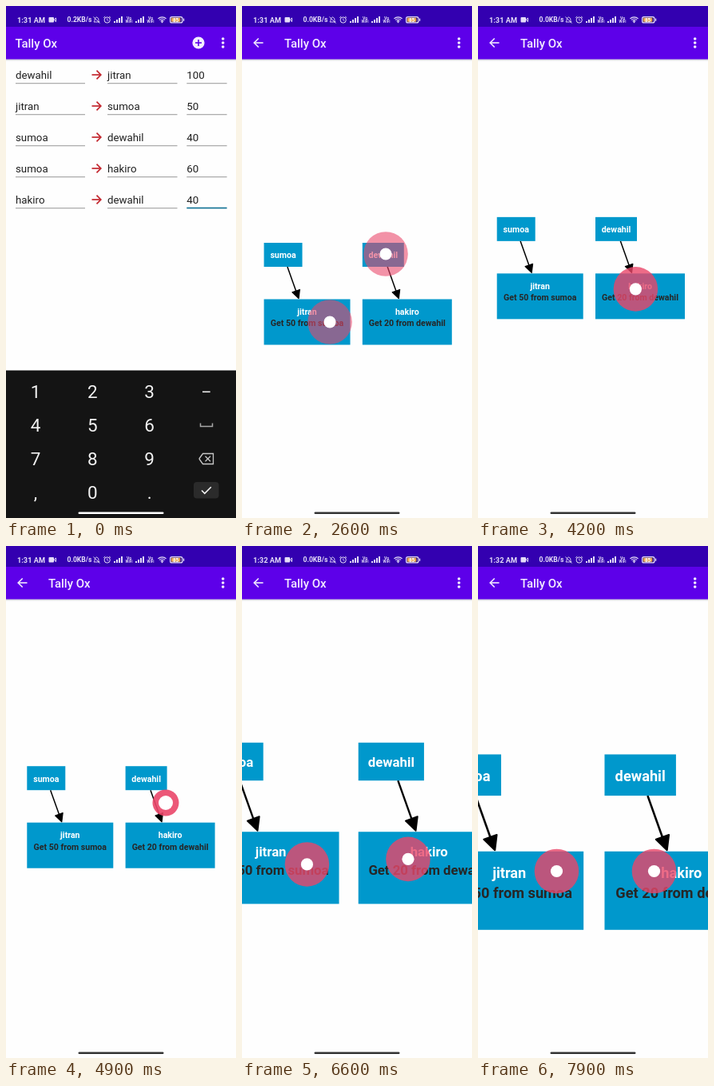
These frames come from a looping animation (288 by 640 pixels, 8 s). An HTML page with a canvas:

```html
<!DOCTYPE html>
<html lang="en">
<head>
<meta charset="utf-8">
<title>Tally Ox</title>
<style>
html, body { margin: 0; width: 100%; height: 100%; overflow: hidden; background: #fff; }
canvas { display: block; width: 288px; height: 640px; }
</style>
</head>
<body>
<canvas id="stage"></canvas>
<script>
const W = 288, H = 640, LOOP = 8000, GRAPH_AT = 1000;
const canvas = document.getElementById('stage');
const ctx = canvas.getContext('2d');
const dpr = window.devicePixelRatio || 1;
canvas.width = W * dpr;
canvas.height = H * dpr;

const debts = [
  ['dewahil', 'jitran', 100],
  ['jitran', 'sumoa', 50],
  ['sumoa', 'dewahil', 40],
  ['sumoa', 'hakiro', 60],
  ['hakiro', 'dewahil', 40]
];

// time, zoom, x, y of the graph
const view = [
  [1900, 1.228, 0, 269.3],
  [2600, 1, 27.5, 296],
  [2900, 1, 27.5, 296],
  [3400, 1, 29.2, 282.5],
  [3700, 1, 29.2, 282.5],
  [4000, 1, 40, 252],
  [4300, 1, 18, 268],
  [4500, 1, 26.3, 275.2],
  [4900, 1, 26.3, 275.2],
  [5400, 1, 41, 440],
  [5500, 1, 42, 447],
  [5900, 1, 26.2, 297.3],
  [6100, 1, 26.2, 297.3],
  [6300, 1.2, -2, 280],
  [7200, 2.67, -184.2, 148],
  [7400, 2.8, -205, 155],
  [7900, 1.72, -53.6, 260.5]
];

// start, end, finger offset from the graph corner
const drags = [
  [2900, 3400, 188.3, 143.5],
  [3700, 4500, 173.7, 90],
  [4900, 5800, 173.7, 45.8]
];

// time and both finger positions
const pinches = [
  [
    [1900, 60, 438, 235, 250],
    [2600, 110, 395, 180, 310]
  ],
  [
    [6100, 118, 402, 172, 392],
    [6300, 105, 400, 184, 392],
    [7200, 14, 392, 276.5, 389.5],
    [7400, 8, 397, 282, 394],
    [7900, 98.5, 406.5, 220.5, 406.5]
  ]
];

function track(keys, t) {
  if (t <= keys[0][0]) return keys[0].slice(1);
  for (let i = 1; i < keys.length; i++) {
    const a = keys[i - 1], b = keys[i];
    if (t <= b[0]) {
      const p = (t - a[0]) / (b[0] - a[0]);
      const e = p * p * (3 - 2 * p);
      return a.slice(1).map((v, k) => v + (b[k + 1] - v) * e);
    }
  }
  return keys[keys.length - 1].slice(1);
}

function rect(x, y, w, h, color) {
  ctx.fillStyle = color;
  ctx.fillRect(x, y, w, h);
}

function round(x, y, w, h, r, color) {
  ctx.fillStyle = color;
  ctx.beginPath();
  ctx.roundRect(x, y, w, h, r);
  ctx.fill();
}

function dot(x, y, r, color) {
  ctx.fillStyle = color;
  ctx.beginPath();
  ctx.arc(x, y, r, 0, 7);
  ctx.fill();
}

function text(s, x, y, size, color, weight = 400, align = 'left') {
  ctx.font = `${weight} ${size}px Roboto, sans-serif`;
  ctx.textAlign = align;
  ctx.fillStyle = color;
  ctx.fillText(s, x, y);
}

function line(points, color, width) {
  ctx.strokeStyle = color;
  ctx.lineWidth = width;
  ctx.beginPath();
  for (let i = 0; i < points.length; i += 2) ctx.lineTo(points[i], points[i + 1]);
  ctx.stroke();
}

function arc(x, y, r, a, b, color, width) {
  ctx.strokeStyle = color;
  ctx.lineWidth = width;
  ctx.beginPath();
  ctx.arc(x, y, r, a, b);
  ctx.stroke();
}

function signal(x) {
  for (let i = 0; i < 4; i++) rect(x + i * 3, 19 - i * 2, 2, 2 + i * 2, '#e6def8');
}

function voWifi(x) {
  text('Vo', x, 16.5, 5, '#e6def8', 700, 'center');
  text('WiFi', x, 21.3, 4.5, '#e6def8', 700, 'center');
}

function statusBar(t) {
  const c = '#e6def8';
  rect(0, 0, W, 26, '#3300b0');
  text(t < 6600 ? '1:31 AM' : '1:32 AM', 14, 20.6, 9.2, c, 600);
  round(53.5, 14, 6.5, 6.5, 1, c);
  line([60, 17.2, 62.5, 15, 62.5, 19.6, 60, 17.2], c, 1);
  text(t < GRAPH_AT ? '0.2KB/s' : '0.0KB/s', 76.5, 20.4, 8.6, c, 600);
  line([110, 20, 111, 18.5, 111.3, 15.5, 113.5, 13.8, 115.7, 15.5, 116, 18.5, 117, 20, 110, 20], c, 0.9);
  line([109.5, 13.5, 117.5, 21.5], c, 0.9);
  arc(126.7, 17.5, 3.6, 0, 7, c, 1);
  line([126.7, 15.4, 126.7, 17.7, 128.3, 18.5], c, 0.8);
  line([122.3, 14.7, 124.2, 13], c, 1);
  line([129.2, 13, 131.1, 14.7], c, 1);
  signal(135);
  voWifi(154);
  signal(162);
  voWifi(181);
  for (const r of [2.6, 5, 7.2]) arc(195.5, 21, r, -2.35, -0.79, c, 1.2);
  dot(195.5, 20.3, 1, c);
  round(205, 13, 16.5, 8.5, 2.6, c);
  round(206.2, 14.2, 14.1, 6.1, 1.6, '#3b1a86');
  round(206.8, 14.7, 11.5, 5.1, 1.2, '#e8a64c');
  rect(222, 15.6, 1.2, 3.2, c);
  text('85', 212.6, 19.9, 6.4, '#fff', 700, 'center');
}

function appBar(graph) {
  const c = '#f3ecff';
  const fade = ctx.createLinearGradient(0, 66, 0, 69);
  fade.addColorStop(0, 'rgba(60,40,110,.35)');
  fade.addColorStop(1, 'rgba(60,40,110,0)');
  rect(0, 66, W, 3, fade);
  rect(0, 25.5, W, 41, '#5d00e9');
  text('Tally Ox', graph ? 53 : 11.5, 52, 15, c, 500);
  if (graph) {
    line([26.5, 46, 15.5, 46], c, 1.6);
    line([20.7, 40.5, 15.2, 46, 20.7, 51.5], c, 1.6);
  } else {
    dot(241, 46, 7.6, c);
    line([237, 46, 245, 46], '#5d00e9', 1.6);
    line([241, 42, 241, 50], '#5d00e9', 1.6);
  }
  for (const y of [41, 46, 51]) dot(271.7, y, 1.8, c);
}

function form() {
  debts.forEach(([from, to, sum], i) => {
    const y = 39 * i, last = i === debts.length - 1;
    [[from, 12, 87], [to, 127, 87.5], [sum, 226.3, 50.3]].forEach(([s, x, w], k) => {
      const active = last && k === 2;
      text(s, x, 91 + y, 13.3, '#202020');
      rect(x, 96.3 + y - (active ? 0.6 : 0), w, active ? 1.6 : 0.9, active ? '#0c6f92' : '#8c8c8c');
    });
    line([107.5, 86 + y, 118.5, 86 + y], '#c3262e', 1.7);
    line([113.5, 80.7 + y, 118.8, 86 + y, 113.5, 91.3 + y], '#c3262e', 1.7);
  });
}

function keyboard() {
  rect(0, 455.5, W, H - 455.5, '#141414');
  ['123', '456', '789', ',0.'].forEach((row, j) => {
    [...row].forEach((s, k) => text(s, 37 + 71.3 * k, 490 + 42 * j, 22.5, '#f2f2f2', 400, 'center'));
  });
  line([246, 482.3, 255.7, 482.3], '#eee', 1.6);
  line([243.5, 521.5, 243.5, 525.5, 258.5, 525.5, 258.5, 521.5], '#a8a8a8', 1.5);
  line([241.8, 566, 246.5, 559.5, 259.5, 559.5, 259.5, 572.5, 246.5, 572.5, 241.8, 566], '#c8c8c8', 1.3);
  line([249.5, 562.8, 256, 569.2], '#c8c8c8', 1.3);
  line([256, 562.8, 249.5, 569.2], '#c8c8c8', 1.3);
  round(235, 595, 31.5, 20.5, 4, '#2b2b2b');
  line([245, 605.5, 248.8, 609.3, 256.8, 601.2], '#f2f2f2', 1.6);
}

function pair(x, topW, lowW, from, to, sum) {
  const blue = '#0098cc', cx = x + topW / 2, lx = x + lowW / 2;
  const dx = lx - cx, len = Math.hypot(dx, 84), ux = dx / len, uy = 84 / len;
  const at = y => cx + dx * (y - 15) / 84;
  const tx = at(70.5) - ux, ty = 70.5 - uy;
  const bx = tx - ux * 10, by = ty - uy * 10;
  line([at(30), 30, bx, by], '#000', 1.5);
  ctx.fillStyle = ctx.strokeStyle = '#000';
  ctx.lineWidth = 1.2;
  ctx.lineJoin = 'round';
  ctx.beginPath();
  ctx.moveTo(tx, ty);
  ctx.lineTo(bx + uy * 5, by - ux * 5);
  ctx.lineTo(bx - uy * 5, by + ux * 5);
  ctx.closePath();
  ctx.fill();
  ctx.stroke();
  ctx.lineJoin = 'miter';
  rect(x, 0, topW, 30, blue);
  rect(x, 70.5, lowW, 57, blue);
  text(from, cx, 19.3, 10.6, '#fff', 700, 'center');
  text(to, lx, 90, 10.6, '#fff', 700, 'center');
  text(`Get ${sum} from ${from}`, lx, 104.3, 10.6, '#262626', 700, 'center');
}

function graph(zoom, x, y) {
  ctx.save();
  ctx.translate(x, y);
  ctx.scale(zoom, zoom);
  pair(0, 48, 108, 'sumoa', 'jitran', 50);
  pair(123.3, 52, 112, 'dewahil', 'hakiro', 20);
  ctx.restore();
}

function touch(x, y, start, end, t) {
  const fresh = t - start < 100;
  const r = fresh ? 16.5 : 27.8, hole = fresh ? 9 : 7.6;
  const alpha = fresh ? 0.9 : t >= end ? 0.58 : 0.8;
  ctx.fillStyle = `rgba(234,70,106,${alpha})`;
  ctx.beginPath();
  ctx.arc(x, y, r, 0, 7);
  ctx.fill();
  dot(x, y, hole, '#fff');
}

function touches(t, gx, gy) {
  for (const [a, b, dx, dy] of drags)
    if (t >= a && t <= b) touch(gx + dx, gy + dy, a, b, t);
  for (const keys of pinches) {
    const a = keys[0][0], b = keys[keys.length - 1][0];
    if (t < a || t > b) continue;
    const [x1, y1, x2, y2] = track(keys, t);
    const end = b === 7900 ? LOOP : b;
    touch(x1, y1, a, end, t);
    touch(x2, y2, a, end, t);
  }
}

function draw(t) {
  const onGraph = t >= GRAPH_AT;
  ctx.setTransform(dpr, 0, 0, dpr, 0, 0);
  rect(0, 0, W, H, '#fefefe');
  const [zoom, x, y] = track(view, t);
  if (onGraph) graph(zoom, x, y);
  else {
    form();
    keyboard();
  }
  appBar(onGraph);
  statusBar(t);
  round(90.5, 632.5, 107, 2.6, 1.3, onGraph ? '#333' : '#fff');
  if (onGraph) touches(t, x, y);
}

function tick() {
  draw(Math.floor(performance.now() % LOOP / 100) * 100);
  requestAnimationFrame(tick);
}
tick();
</script>
</body>
</html>
```
